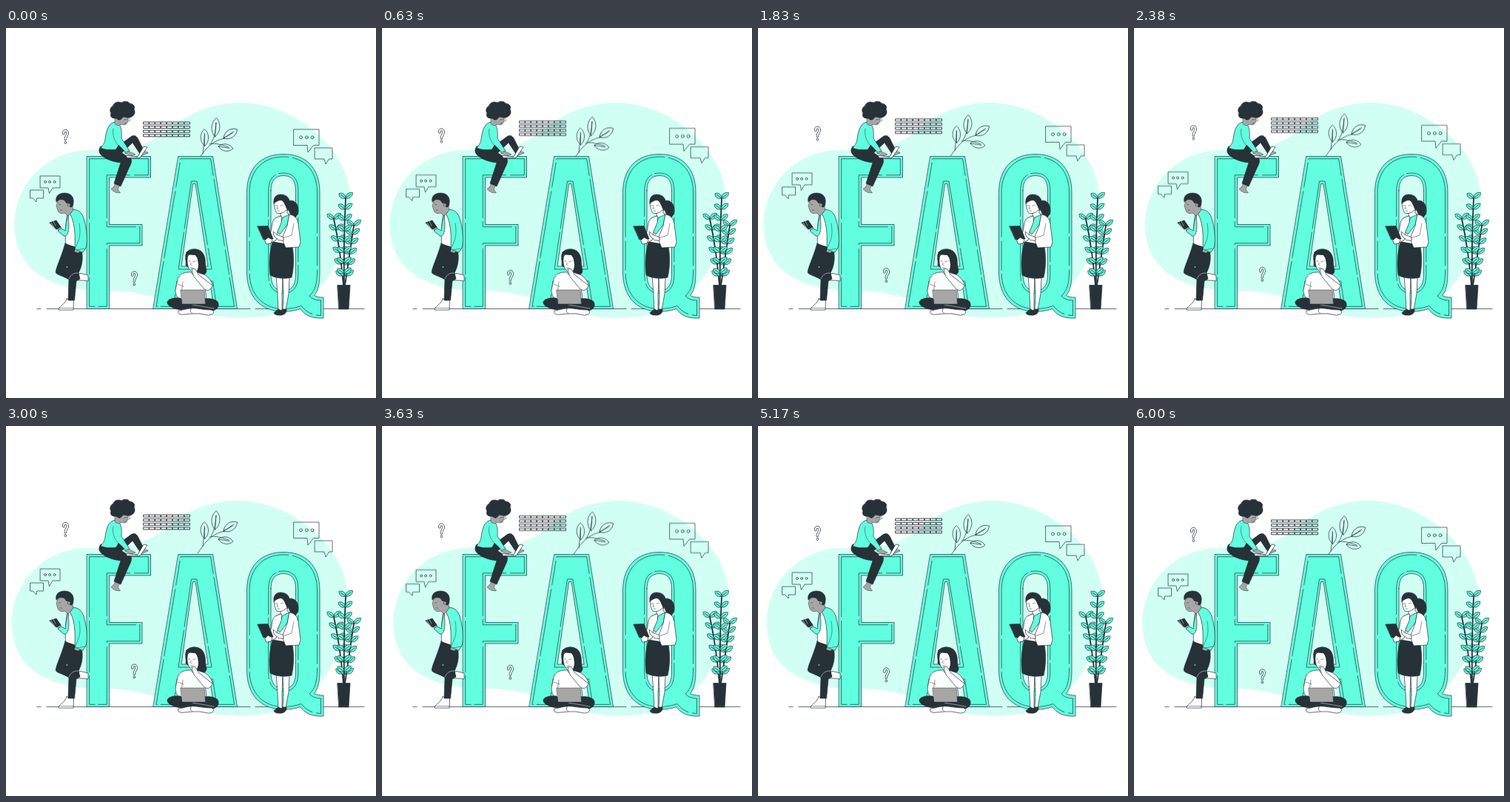
An HTML page that plays this animation: 500 by 500 pixels, repeating every 6.04 s.

```html
<!DOCTYPE html>
<html lang="en">
<head>
<meta charset="utf-8">
<title>FAQ</title>
<style>
html, body { margin: 0; width: 100%; height: 100%; overflow: hidden; background: #fff; }
svg { display: block; width: 100%; height: 100%; stroke: #263238; stroke-width: .7; stroke-linecap: round; stroke-linejoin: round; }
.line { fill: none; }
.mint { fill: #61ffdf; }
.dark { fill: #263238; }
.white { fill: #fff; }
.skin { fill: #a6a6a6; stroke-width: .5; }
.pale { fill: #d1fff4; }
.bare { stroke: none; }
.seam { fill: none; stroke-linecap: butt; }
</style>
</head>
<body>
<svg viewBox="0 0 500 500">
  <path id="blob" class="pale bare" d="M11.500 267C11 207 62 161 122 165C163 168 198 158 226 133C252 111 287 100.500 319 101C388 102 463 160 466 232C466 302 431 365 376 384C331 397 272 393 228 374C198 361 169 355 137 355C75 356 12 336 11.500 267Z"/>
  <path class="line" d="M42 379.500H47M55 379.500H330M337 379.500H484"/>

  <g class="float line">
    <path d="M46.500 200H73V216H63L58.500 223.500L57 216H46.500Z"/>
    <path d="M33 219H50.500V230H41.500L41 235L36.500 230H33Z"/>
    <circle cx="53" cy="208" r="1.500"/><circle cx="59" cy="208" r="1.500"/><circle cx="65.500" cy="208" r="1.500"/>
    <path d="M389 137H423V158.500H415.500L408 168L407 158.500H389Z"/>
    <path d="M417.500 162H441V177H436.500L432 184L430 177H417.500Z"/>
    <circle cx="398.500" cy="147.800" r="2"/><circle cx="406.300" cy="147.800" r="2"/><circle cx="414" cy="147.800" r="2"/>
  </g>
  <g class="float" id="asks"></g>
  <g class="float line" id="bricks"></g>
  <g class="float line" id="branch"><path d="M259 179C268 166 276 153 295 149M266 170L268.500 144M277 156Q283 147 284 128M275 157Q282 154 301 161M294 149L306 142"/></g>

  <!-- letters -->
  <path class="mint" d="M109.500 173.500H195.500V202H139.500V265.500H184V294H139.500V379.500H109.500Z"/>
  <path class="seam" stroke-dasharray="47 4 70 5 90 4" d="M112.700 176.700H192.300V198.800H136.300V268.700H180.800V290.800H136.300V376.300H112.700Z"/>
  <path class="mint" fill-rule="evenodd" d="M233 173.500H279.500L312.500 379.500H281L276 346H235L230 379.500H199ZM252.500 211L237 322H273L256 211Z"/>
  <path class="seam" stroke-dasharray="64 4 92 5 34 4" d="M236 176.700H276.500L308.500 376.300H284.500L279.500 342H231L226.500 376.300H203Z"/>
  <path class="seam" stroke-dasharray="95 4 30 0" d="M250.500 207H257.800L278 326H233Z"/>
  <path class="mint" fill-rule="evenodd" d="M325.500 222C325.500 190 344 170.500 375 170.500S424 190 424 222V330C424 345 422 355 416.500 361.500C420 363.500 424 364 429 364V392C413 393 404 388 397.500 379.500C391 382 384 383 375 383C344 383 325.500 363 325.500 330ZM358 220V333C358 348 364 355 375 355S391.500 348 391.500 333V220C391.500 206 386 199.500 375 199.500S358 206 358 220Z"/>
  <path class="seam" stroke-dasharray="82 5 118 4 40 5" d="M329 222C329 193 347 174 375 174S420.500 193 420.500 222V330C420.500 346 417 356 410 362C415 367 420 368 425.500 368V388.500C413 388 406 384 399 375.500C392 378 384 379.500 375 379.500C347 379.500 329 360 329 330Z"/>
  <path class="seam" stroke-dasharray="74 4 60 4" d="M354.700 333V220C354.700 204 362 196 375 196S394.800 204 394.800 220V333C394.800 350 388 358.500 375 358.500S354.700 350 354.700 333Z"/>

  <!-- sitting on the F -->
  <g>
    <path class="dark" d="M147 163L170 146C174 144.500 176 146 178 149L187 167L181 170L171 155L151 174Z"/>
    <path class="skin" d="M180 170L187 166C189 168 192 167 192 169L182 173Z"/>
    <path class="skin" d="M148 209L154 212L151 218L154.500 222.500C148 224 143 219 142 217.500L146 214Z"/>
    <path class="dark" d="M128 160C125 164 125 168 129 172C137 179 147 181 155 182L146 210L155 214L168.500 184C171 178 169 174 163 173L149 164Z"/>
    <path class="mint" d="M148 127C139 128 136 136 134 150C133 157 130 159 128 162C134 165 142 165 149 164L152 158L163 169L167 166L156 149C157 139 155 133 153 130Z"/>
    <path class="line" d="M145 136C143 146 147 152 151 158L162 170" stroke-width=".5"/>
    <path class="skin" d="M161 169L165 166L175 171L169 173ZM147 124V129C150 133 153 132 156 130C162 133 165 128 165 124V117H150Z"/>
    <path class="dark" d="M149 122C143 123 140 119 142 115C139 111 142 106 145 105C146 100 152 99 156 101C160 98 166 99 167 102C172 102 175 106 173 110C176 115 172 120 167 121C165 122 162 120 158 120C156 124 153 126 149 122Z"/>
    <path class="line" d="M160 124L163 123.500M160 129H162.500M166 122L168 125L165.500 126" stroke-width=".5"/>
    <path class="white" d="M162 172.500L178 174L186 160L191 161L181 175.500H164Z"/>
  </g>

  <!-- leaning on the F -->
  <g>
    <path class="white" d="M96 333L101 331.500L111 334V342C107 341 101 341 97 341Z"/>
    <path class="white" d="M82 366L91.500 367.500L91 381H71C71 376 79 375 82 366Z"/>
    <path class="line" d="M72 378.500H91" stroke-width=".5"/>
    <path class="white" d="M83 248L92 246L98 298L81 293C79 281 81 263 83 248Z"/>
    <path class="dark" d="M80 291C85 294 95 296 102 299C105 313 102 323 98 331L100 339L95 342L92.500 368H84L85 340C77 335 70 334 67.500 331C66 327 74 312 80 291Z"/>
    <path class="line" d="M85 339C88 333 91 331 97 331" stroke="#fff" stroke-width=".5"/>
    <circle class="bare white" cx="82.500" cy="323" r=".8"/>
    <path class="mint" d="M91 245C97 246 102 248 105 257C109 270 111 287 108 297L104 303L93 302C93 286 95 268 87 252Z"/>
    <path class="line" d="M99 264C101 277 100 284 96 292L93 299M107 298L95 300" stroke-width=".5"/>
    <path class="skin" d="M94 299L101 302L97 304L92 302Z"/>
    <path class="mint" d="M84 253C81 262 81 269 80 274L73 270L70 274L78 281C83 283 85 275 85 266Z"/>
    <path class="skin" d="M72 273L75 270L71 265L67 263L65 267L68 271Z"/>
    <path class="dark" d="M59 263L68 260L74 269L68 272Z"/>
    <path class="line" d="M61 263L65 269M64 261.500L67 267" stroke="#bbb"/>
    <path class="skin" d="M71 232C69 237 67 240 69 243C70 249 73 252 79 250L84 254L91 246L88 232Z"/>
    <path class="dark" d="M68 235C66 228 71 223 79 223C88 223 92 229 91 236C91 240 90 242 87 242L84 237L81 236C80 232 76 231 72 232Z"/>
    <circle class="skin" cx="85" cy="239" r="2"/>
    <path class="line" d="M71.500 239L74 238.500M73 246H75.500" stroke-width=".5"/>
  </g>

  <!-- sitting on the floor -->
  <g>
    <path class="dark" d="M244 303C250 296 264 298 267 306C271 313 268 320 271 327C271 333 266 336 260 333L243 321C244 315 241 309 244 303Z"/>
    <path class="white" d="M247 330C240 330 234 333 232 339L229 354C229 361 232 368 240 368H271L269 349L279 349C279 343 273 335 267 333L258 330Z"/>
    <path class="line" d="M239 343L237 358M232 346L240 349M269 349L265 341" stroke-width=".5"/>
    <path class="white" d="M246 306C244 314 245 320 247 325C250 328 251 329 251 332C254 335 258 333 258 329C262 321 261 312 257 307Z"/>
    <path class="dark" d="M246 308C249 302 254 303 257 308C261 313 259 319 262 326L267 324L265 306L254 300Z"/>
    <path class="line" d="M247 315H249M253 315.500L256 315M250 317L249.500 320L251 320.500M250 324H253" stroke-width=".5"/>
    <path class="white" d="M251 326L255 325L258 329L260 333L279 348C277 354 273 356 268 353L254 336C252 333 253 330 251 326Z"/>
    <path class="dark" d="M235 365C225 364 217 367 218 372C220 377 229 380 237 381L250 384L280 382C286 380 289 375 286 370C283 366 275 365 267 366L251 373Z"/>
    <path class="white" d="M254 379C247 378 241 381 233 382C231 386 235 388 241 387L252 386Z"/>
    <path class="white" d="M250 379C258 378 265 381 278 381C283 384 280 388 273 388L262 386H252C249 384 249 382 250 379Z"/>
    <path class="line" d="M252 374L281 379" stroke="#fff" stroke-width=".5"/>
    <path class="skin" d="M236 354H268L269.500 373H238Z"/>
    <path class="line" d="M238 373.500H270"/>
  </g>

  <!-- standing by the Q -->
  <g>
    <path class="white" d="M365 334L367 361L368 383H373L373 361L374 336ZM374 336L375 362L374 381H378L382 359L383 336Z"/>
    <path class="dark" d="M368 380L373 382L371 387C368 389 363 388 362 385ZM374 380H379C380 385 375 389 369 388Z"/>
    <path class="dark" d="M361 286C356 301 355 319 357 334C366 339 378 339 386 337C390 319 389 302 385 286Z"/>
    <path class="dark" d="M381 234C388 231 395 236 395 246C395 252 392 256 387 258C385 251 380 247 381 234Z"/>
    <path class="white" d="M371 247V254L364 257C359 264 358 279 361 289L385 293L386 254L380 250V241Z"/>
    <path class="mint" d="M374 256L383 252L380 266L370 279L367 276Z"/>
    <path class="white" d="M372 254C364 256 361 258 360 264L357 280L351 286L354 292L365 287L367 275L372 263Z"/>
    <path class="white" d="M383 252C390 253 394 257 395 265L398 289L396 296L378 297L373 285L380 267Z"/>
    <path class="line" d="M389 264L386 280L371 285" stroke-width=".5"/>
    <path class="white" d="M374 282L367 280L361 275L362 281L369 287L375 287Z"/>
    <path class="dark" d="M340 268L354 267.500L361 285L348 286Z"/>
    <path class="white" d="M350 287L354 283L360 286L358 291L352 292Z"/>
    <path class="white" d="M363 232C362 240 363 246 366 250C371 252 377 249 381 244L382 234L373 228Z"/>
    <path class="dark" d="M362 237C361 230 364 225 371 225C379 225 384 230 383 237L381 247C378 242 377 236 373 233C369 232 366 234 362 237Z"/>
    <path class="line" d="M364 240H367M371 240L374 239.500M367 241L366 244H368M367 247H370" stroke-width=".5"/>
  </g>

  <g id="plant"></g>
  <path class="dark" d="M448 347.500H465L463 380H450Z"/>
</svg>
<script>
const LOOP = 6040;
const byId = id => document.getElementById(id);

function add(parent, tag, attrs) {
  const node = document.createElementNS('http://www.w3.org/2000/svg', tag);
  for (const key in attrs) node.setAttribute(key, attrs[key]);
  parent.append(node);
}

function leaf(parent, x, y, angle, length, width, look) {
  const a = length * .25, b = length * .75;
  add(parent, 'path', {
    class: look,
    d: `M0 0C${a} ${-width} ${b} ${-width} ${length} 0C${b} ${width} ${a} ${width} 0 0M0 0H${length * .75}`,
    transform: `translate(${x} ${y}) rotate(${angle})`
  });
}

// outlined question marks: a wide dark stroke under a narrower pale one
for (const [x, y, inside] of [[80.5, 137, '#fff'], [173.5, 328.5, '#d1fff4']]) {
  for (const [stroke, width] of [['#263238', 3.4], [inside, 2]]) {
    add(byId('asks'), 'path', {
      class: 'line', stroke, 'stroke-width': width,
      d: 'M-2.700 5.500C-3.500 .500 2.800 .500 2.700 5.200C2.700 8.500 -.2 9 -.2 13.500M-.2 17.800V18',
      transform: `translate(${x} ${y})`
    });
  }
}

for (let row = 0; row < 4; row++) {
  for (let col = 0; col < 8; col++) {
    add(byId('bricks'), 'rect', {
      x: 186 + col * 7.9, y: 127 + row * 5.6, width: 7.1, height: 3, 'stroke-width': .9
    });
  }
}

leaf(byId('branch'), 268.5, 159.5, -91, 23, 7, 'line');
leaf(byId('branch'), 282.5, 147, -86, 25.5, 7.3, 'line');
leaf(byId('branch'), 294, 149, -33, 22, 7.3, 'line');
leaf(byId('branch'), 287, 160, 9, 20, 6.3, 'line');

// stem: root, bend, tip, number of leaf pairs
const stems = [
  [456, 348, 452, 300, 443, 258, 6],
  [458, 348, 465, 300, 470, 267, 6],
  [457, 348, 456, 290, 459, 230, 8]
];
for (const [x0, y0, x1, y1, x2, y2, pairs] of stems) {
  const plant = byId('plant');
  add(plant, 'path', { class: 'line', d: `M${x0} ${y0}Q${x1} ${y1} ${x2} ${y2}`, 'stroke-width': 1.8 });
  for (let i = 0; i < pairs; i++) {
    const t = .14 + .86 * i / (pairs - 1), u = 1 - t;
    const x = u * u * x0 + 2 * u * t * x1 + t * t * x2;
    const y = u * u * y0 + 2 * u * t * y1 + t * t * y2;
    leaf(plant, x, y, -145, 11, 4.2, 'mint');
    leaf(plant, x, y, -38, 12, 4.2, 'mint');
  }
}

const slide = (node, offsets, axis) => node.animate(
  offsets.map(v => ({ transform: `translate${axis}(${v}px)` })),
  { duration: LOOP, iterations: Infinity, easing: 'linear' }
).startTime = 0;

slide(byId('blob'), [0, -1, 2, -4, 4, -4, 4, -4, 2, -1, 0], 'X');
document.querySelectorAll('.float').forEach(node => slide(node, [0, -7, 0], 'Y'));
</script>
</body>
</html>
```
